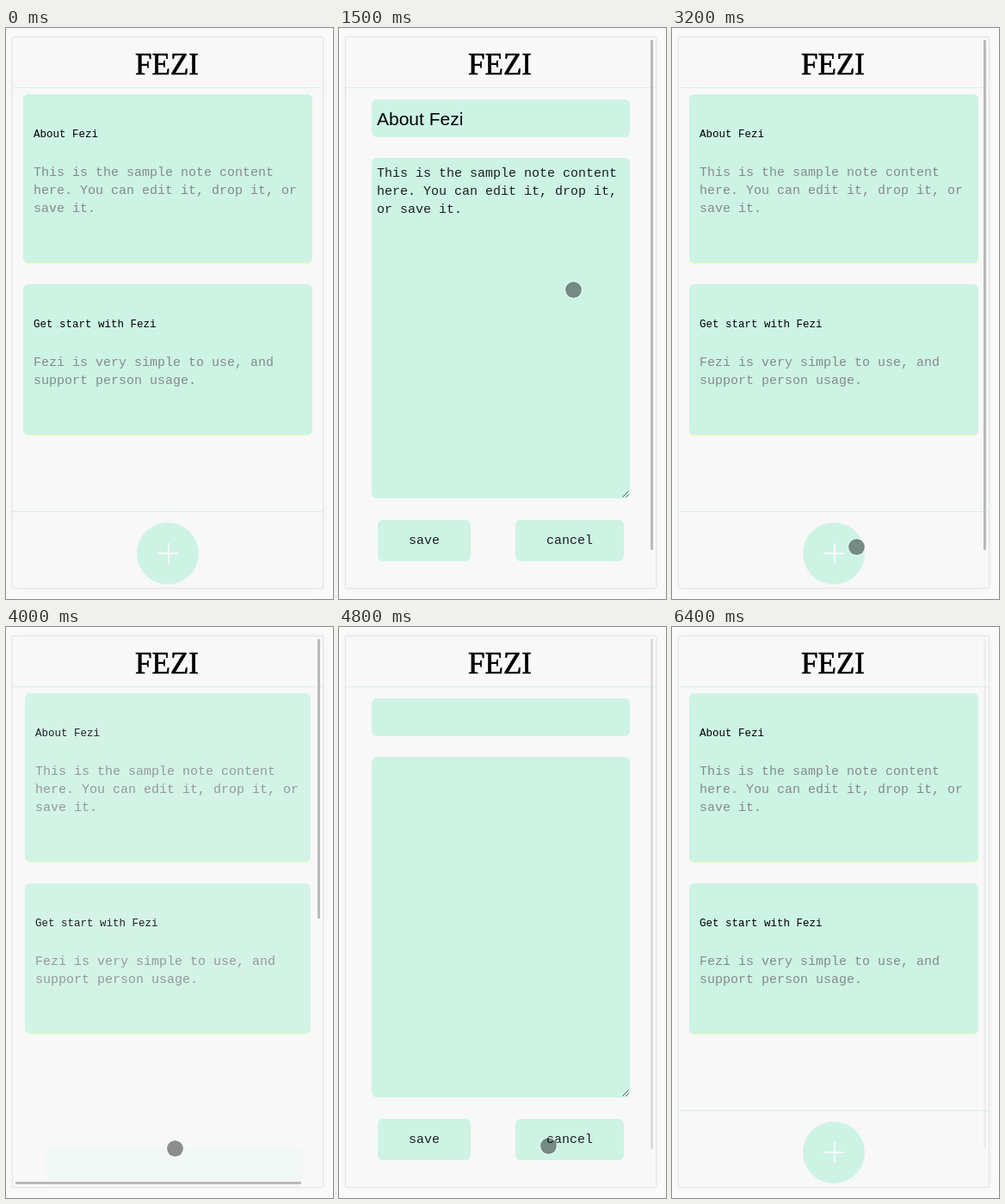
Recreate the animation shown at these times as an HTML page. Size 380 by 664 pixels, loop 7.9 s.

```html
<!DOCTYPE html>
<html lang="en">
<head>
<meta charset="utf-8">
<title>Notes</title>
<style>
  html, body { margin: 0; width: 100%; height: 100%; overflow: hidden; background: #fafafa; }
  div, p, h2 { position: absolute; margin: 0; box-sizing: border-box; }
  #app { left: 8px; top: 11px; width: 360px; height: 640px; overflow: hidden; background: #f8f8f8; }
  #frame { left: 8px; top: 11px; width: 360px; height: 640px; border-radius: 1px;
    box-shadow: 0 0 0 1px #e3e3e3, 0 0 7px rgba(0,0,0,.07); }
  #view { left: -8px; top: -11px; width: 380px; height: 664px;
    font: 15px/21px "Liberation Mono", "Courier New", monospace; }
  #title { left: 8px; top: 23px; width: 358px; text-align: center; color: #000;
    font: 35px/40px "Liberation Serif", "Times New Roman", serif; -webkit-text-stroke: .6px #000; }
  #rule { left: 8px; top: 69px; width: 360px; height: 1px; background: #dcf0e9; }
  #list { top: 77px; }
  .card { position: relative; margin-bottom: 24px; padding: 37px 12px 52px; border-radius: 6px;
    background: #cdf3e4; border-bottom: 1px solid #e9fcb0; }
  .card h2 { position: static; height: 44px; font-size: 12.5px; line-height: 21px; font-weight: 400; color: #000; }
  .card p { position: static; color: #858b88; }
  #form { left: 0; top: 0; width: 380px; height: 664px; color: #1c201e; }
  .box { background: #cdf3e4; border-radius: 6px; }
  #name { left: 38px; top: 83px; width: 300px; height: 44px; padding-left: 6px; color: #000;
    font: 21px/46px "Liberation Sans", Arial, sans-serif; }
  #note { left: 38px; top: 151px; width: 300px; height: 396px; padding: 8px 6px; }
  #note svg { position: absolute; right: 1px; bottom: 1px; }
  .btn { top: 572px; height: 48px; line-height: 49px; text-align: center; }
  #foot { left: 8px; top: 562px; width: 360px; height: 90px; background: #f8f8f8; border-top: 1px solid #cdf3e4; }
  #add { left: 144px; top: 12px; width: 72px; height: 72px; border-radius: 50%; background: #cdf3e4; }
  #add::before, #add::after { content: ""; position: absolute; background: #f8fcfa; }
  #add::before { left: 24px; top: 35px; width: 24px; height: 2px; }
  #add::after { left: 36px; top: 24px; width: 2px; height: 24px; }
  .bar { background: #b9b9b9; border-radius: 1px; }
  #vbar { left: 362px; top: 14px; width: 3px; }
  #hbar { left: 11px; top: 645px; height: 3px; }
  #dot { left: -10px; top: -10px; width: 21px; height: 21px; border-radius: 50%;
    background: rgba(0,0,0,.43); background-clip: padding-box; border: 1px solid rgba(255,255,255,.6); }
</style>
</head>
<body>
<div id="frame"></div>
<div id="app"><div id="view">
  <div id="title">FEZI</div>
  <div id="rule"></div>
  <div id="list">
    <div class="card"><h2>About Fezi</h2><p>This is the sample note content here. You can edit it, drop it, or save it.</p></div>
    <div class="card"><h2>Get start with Fezi</h2><p>Fezi is very simple to use, and support person usage.</p></div>
  </div>
  <div id="form">
    <div id="name" class="box"></div>
    <div id="note" class="box"><span id="text"></span>
      <svg width="8" height="8" stroke="#555" stroke-width="1"><path d="M0.5 7.5L7.5 0.5M4.5 7.5L7.5 4.5"/></svg>
    </div>
    <div class="box btn" style="left:45px;width:108px">save</div>
    <div class="box btn" style="left:205px;width:126px">cancel</div>
  </div>
  <div id="foot"><div id="add"></div></div>
  <div id="vbar" class="bar"></div>
  <div id="hbar" class="bar"></div>
  <div id="dot"></div>
</div></div>
<script>
const LOOP = 7900, END = 6400, STEP = 100;
const $ = id => document.getElementById(id);
const [list, form, foot, vbar, hbar, dot, nameBox, text] =
  ['list', 'form', 'foot', 'vbar', 'hbar', 'dot', 'name', 'text'].map($);
const clamp = v => Math.min(1, Math.max(0, v));

// taps alternate: open the form, go back to the list
const taps = [1200, 2700, 4000, 5500];

// pointer moves: start, end, x, y
const moves = [
  [0, 400, 349, 104],
  [400, 600, 259, 135],
  [1200, 1500, 272, 304],
  [1700, 1800, 272, 541],
  [1900, 2300, 266, 595],
  [3000, 3400, 196, 606],
  [4400, 4900, 245, 603],
  [5500, 5900, 349, 572]
];

function pointer(t) {
  let [, , x, y] = moves[0];
  for (const [from, to, nx, ny] of moves) {
    const p = clamp((t - from) / (to - from)), e = 1 - (1 - p) ** 2;
    x += (nx - x) * e;
    y += (ny - y) * e;
  }
  return [Math.round(x), Math.round(y)];
}

// the entering pane fades in while both panes stay stacked, then the old one goes
function scene(t) {
  const i = taps.findLastIndex(tap => tap <= t);
  if (i < 0) return { a: 1, b: 0, drop: 0, content: 684, over: 0, bar: 0 };
  const k = (t - taps[i]) / STEP, opening = i % 2 === 0;
  const enter = clamp((opening ? .14 : .35) + .43 * k);
  const stacked = k < (opening ? 3 : 2);
  return {
    a: opening ? 1 - enter : enter,
    b: opening ? enter : 0,
    drop: opening && stacked ? 523 + 31 * k : 0,
    content: stacked ? (opening ? 1248 : 1339) + 31 * k : 684,
    over: (opening ? 28 : 19) * (1 - enter),
    bar: k < 7 ? 1 : clamp(.75 - .3 * (k - 7))
  };
}

function draw(time) {
  const t = Math.min(END, Math.floor(time % LOOP / STEP) * STEP);
  const { a, b, drop, content, over, bar } = scene(t);

  const inset = 20 + Math.round((1 - a) * 11);
  list.style.left = inset + 'px';
  list.style.width = 376 - 2 * inset + 'px';
  list.style.opacity = a;

  form.style.opacity = b;
  form.style.transform = `translate(${Math.round((1 - b) * 9)}px, ${drop}px)`;
  const filled = t < taps[2];
  nameBox.textContent = filled ? 'About Fezi' : '';
  text.textContent = filled ? 'This is the sample note content here. You can edit it, drop it, or save it.' : '';
  foot.style.display = b ? 'none' : 'block';

  vbar.style.height = Math.round(634 * 640 / content) + 'px';
  vbar.style.opacity = bar;
  hbar.style.width = over ? Math.round(354 * 360 / (360 + over)) + 'px' : 0;

  const [x, y] = pointer(t);
  dot.style.display = t >= 400 && t < 6200 ? 'block' : 'none';
  dot.style.transform = `translate(${x}px, ${y}px)`;
}

const start = performance.now();
function tick() {
  draw(performance.now() - start);
  requestAnimationFrame(tick);
}
tick();
</script>
</body>
</html>
```
